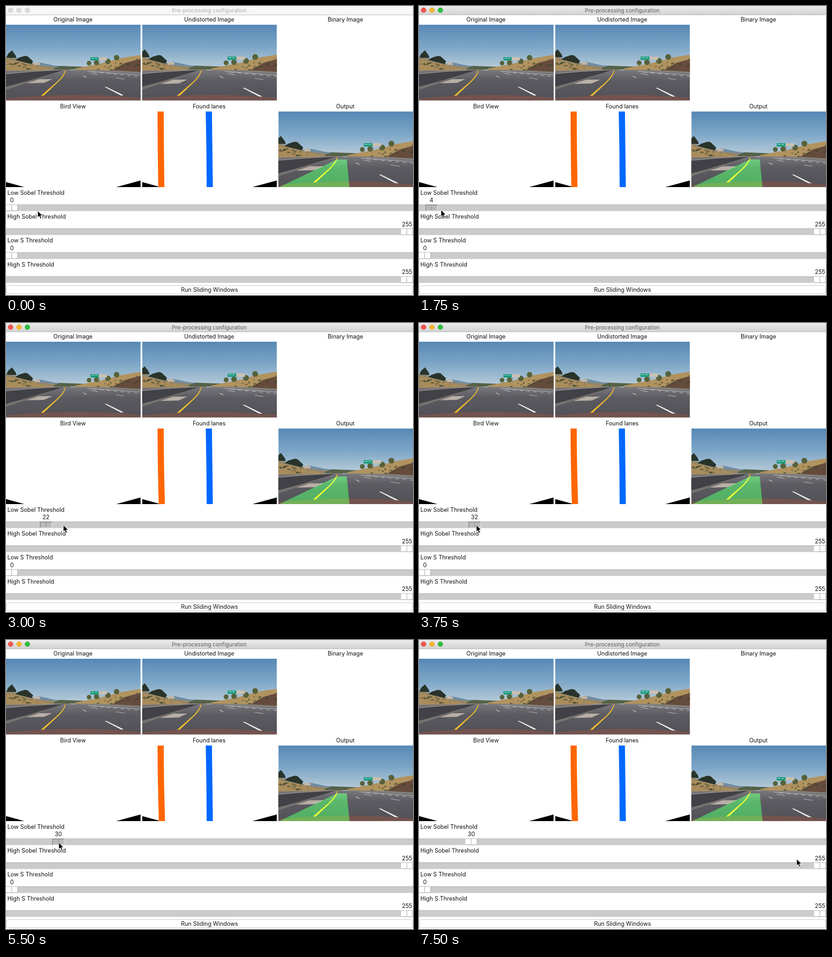
Recreate the animation shown at these times as an HTML page. Size 887x632 px, loop 8000 ms.

```html
<!DOCTYPE html>
<html lang="en">
<head>
<meta charset="utf-8">
<title>Pre-processing configuration</title>
<style>
  html, body { margin: 0; width: 100%; height: 100%; overflow: hidden; background: #fff; }
  svg { display: block; }
  text { font: 12.5px Inter, "Open Sans", sans-serif; fill: #111; }
  .mid { text-anchor: middle; }
  #title { font-size: 11.8px; fill: #5c5c5c; }
  #bar { fill: url(#chrome); }
  .light { stroke-width: .8; }
  .idle #bar { fill: #f6f6f6; }
  .idle #title { fill: #adadad; }
  .idle .light { fill: #dadada; stroke: #c6c6c6; }
  .thumb .face { fill: #fff; }
  .thumb .edge { fill: none; stroke: #a2a2a2; }
  .thumb .inset { fill: none; stroke: none; }
  .pressed .face { fill: #b9b9b9; }
  .pressed .edge { stroke: #e6e6e6; }
  .pressed .inset { stroke: #6e6e6e; }
</style>
</head>
<body>
<svg id="stage" width="887" height="632" viewBox="0 0 887 632">
  <defs>
    <linearGradient id="chrome" x2="0" y2="1">
      <stop stop-color="#ececec"/><stop offset="1" stop-color="#d2d2d2"/>
    </linearGradient>
    <linearGradient id="sky" x2="0" y2="1">
      <stop stop-color="#5688b5"/><stop offset=".5" stop-color="#7ea7c8"/>
      <stop offset="1" stop-color="#bdcfda"/>
    </linearGradient>
    <linearGradient id="asphalt" x2="0" y2="1">
      <stop stop-color="#77777c"/><stop offset=".25" stop-color="#5b5b61"/>
      <stop offset="1" stop-color="#4a4a50"/>
    </linearGradient>
    <g id="land">
      <path fill="#6e8ca5" d="M55 92V86L72 82 104 89 128 91V96Z"/>
      <path fill="#94866a" d="M-15 70 10 72 52 82 66 88 140 95V101H-15Z"/>
      <path fill="#a98c5c" d="M-15 73 14 78 62 89 110 101H-15Z"/>
      <path fill="#556148" d="M104 95 118 90 172 92 190 88V98H104Z"/>
      <path fill="#b1935f" d="M150 96 205 85 250 73 310 63V105H150Z"/>
      <path fill="#654c3c" d="M232 100 258 84 310 70V105Z"/>
      <g id="shrubs" fill="#3c4630"></g>
      <g fill="#29332a">
        <path d="M1 72 4 64 13 56 21 67 23 73Z"/>
        <path d="M20 77 28 72 41 68 47 69 59 80 56 86Z"/>
      </g>
      <g fill="#56613a">
        <circle cx="181" cy="84" r="5"/><circle cx="197" cy="83" r="5.500"/>
        <circle cx="222" cy="80" r="6"/><circle cx="241" cy="72" r="6"/>
      </g>
      <path stroke="#77736d" d="M67.500 87V98M203 77V91M217 77V86"/>
      <path fill="#c4b6a4" d="M61 83H74V88H61Z"/>
      <path fill="#c9c0b1" d="M202 71H220V78H202Z"/>
      <path fill="#169a7c" d="M184 71H202V78H184Z"/>
      <path stroke="#bfe3d5" d="M186 73.500H192M194 73.500H199"/>
      <path fill="url(#asphalt)" d="M-15 101 118 99 220 100 310 107V190H-15Z"/>
      <path fill="#85817c" d="M150 98 220 99 310 104V107L150 99.500Z"/>
      <path fill="#414147" d="M-15 109 60 102 124 99 100 108 50 122-15 140Z"/>
      <path fill="none" stroke="#96918b" stroke-width="1.6" d="M-15 108.500 60 102 119 98.500"/>
      <path fill="#77716e" d="M-15 140 50 122 124 100 50 126-15 147Z"/>
      <path fill="#b9afa6" d="M45 128 72 119H101L83 127Z"/>
      <path fill="#f4bc2d" d="M130 100Q128 112 115 124L79 158H73L112 124Q126 111 128.500 100Z"/>
      <path fill="#f4f4f2" d="M215 136H219L256 154 251 155ZM167 111.500H169L176 115.500H174Z"/>
      <path fill="none" stroke="#c9c9c9" stroke-width=".9" d="M184 106 200 109M240 116 258 119M178 102 310 111"/>
      <path fill="none" stroke="#d8d8d8" stroke-width=".8" stroke-dasharray="7 8" d="M190 103.500 310 115"/>
    </g>
    <path id="hood" fill="#73534e" d="M0 161Q150 146 293.500 160V165.500H0Z"/>
    <path id="corners" d="M0 154.500 40 165.500H0ZM240 165.500 293.500 151V165.500Z"/>
  </defs>

  <rect width="887" height="632" fill="#fff"/>
  <rect id="bar" width="887" height="19"/>
  <path d="M0 19.500H887" stroke="#b9b9b9"/>
  <g id="lights"></g>
  <text id="title" class="mid" x="443" y="13.500">Pre-processing configuration</text>
  <g id="panels"></g>
  <g id="sliders"></g>
  <rect x=".5" y="611.500" width="886" height="17.500" rx="4" fill="#fff" stroke="#c5c5c5"/>
  <text class="mid" x="443.500" y="625">Run Sliding Windows</text>
  <path id="cursor" d="M0 0V14.500L3.400 11.400 6 17 8.500 16 6 10.500H10.500Z" stroke="#fff" stroke-width=".9"/>
</svg>
<script>
const $ = id => document.getElementById(id);
const LOOP = 8000, TICK = 250, TRACK = 861, THUMB = 26;

// time, then the values reached at that time
const cursorKeys = [
  [0, 69, 448], [250, 58, 456], [750, 15, 449], [1000, 14, 448], [1250, 20, 448],
  [1750, 48, 446], [2500, 97, 444], [3000, 125, 442], [3750, 125, 442], [4500, 116, 442],
  [4750, 115, 442], [6000, 115, 444], [6500, 678, 518], [6750, 678, 518], [7500, 823, 479]
];
const valueKeys = [
  [1000, 0], [1250, 1], [1750, 4], [2500, 17], [3000, 22], [3500, 30],
  [4000, 33], [4500, 33], [5250, 30]
];

function valuesAt(keys, time) {
  const next = keys.findIndex(key => key[0] > time);
  if (next < 1) return keys.at(next).slice(1);
  const a = keys[next - 1], b = keys[next];
  const part = (time - a[0]) / (b[0] - a[0]);
  return a.slice(1).map((v, i) => Math.round(v + (b[i + 1] - v) * part));
}

function scatterShrubs() {
  let seed = 7;
  const random = () => (seed = seed * 16807 % 2147483647) / 2147483647;
  let marks = '';
  for (let i = 0; i < 46; i++) {
    const right = i % 2;
    const x = right ? 200 + random() * 95 : random() * 58;
    const top = right ? 86 - (x - 200) * .17 : 74 + x * .2;
    const y = top + 2 + random() * (right ? 16 : 12);
    marks += `<ellipse cx="${x}" cy="${y}" rx="${1 + random() * 3}" ry="${.7 + random() * 1.5}" opacity="${.35 + random() * .5}"/>`;
  }
  $('shrubs').innerHTML = marks;
}

const road = zoom => `<rect width="293.5" height="100" fill="url(#sky)"/>
  <use href="#land" transform="translate(146 99) scale(${zoom}) translate(-146 -99)"/>
  <use href="#hood"/>`;

const panels = [
  ['Original Image', road(1)],
  ['Undistorted Image', road(1.055)],
  ['Binary Image', ''],
  ['Bird View', '<use href="#corners"/>'],
  ['Found lanes', `<use href="#corners"/><path id="leftLane" fill="#ff6600"/>
    <path fill="#0068ff" d="M138.5 0H152L154 165.5H140.5L140 90Z"/>`],
  ['Output', road(1.055) + `<path d="M128 105H149L155 165.5H2Z" fill="#005c0a"
    style="mix-blend-mode:plus-lighter"/>`]
];

function buildPanels() {
  $('panels').innerHTML = panels.map(([label, body], i) => {
    const x = i % 3 * 296.8, y = i < 3 ? 41 : 230.5;
    return `<text class="mid" x="${x + 146}" y="${y - 7}">${label}</text>
      <svg x="${x}" y="${y}" width="293.5" height="165.5" overflow="hidden">${body}</svg>`;
  }).join('');
}

const thumbX = value => Math.round(value / 255 * TRACK);

function buildSliders() {
  const rows = [['Low Sobel', 0], ['High Sobel', 255], ['Low S', 0], ['High S', 255]];
  $('sliders').innerHTML = rows.map(([name, value], i) => `
    <g transform="translate(0 ${434 + i * 52.35})">
      <text x="3" y="-21.5">${name} Threshold</text>
      <rect width="887" height="14.5" fill="#cbcbcb"/>
      <path d="M0 .5H887" stroke="#b4b4b4"/>
      <g class="thumb" transform="translate(${thumbX(value)} 0)">
        <text class="mid" x="13" y="-4.8">${value}</text>
        <rect class="face" y="1" width="${THUMB}" height="13"/>
        <path class="edge" d="M12.5 1V14M25.5 1V14M0 13.8H26"/>
        <path class="inset" d="M.5 14V1H26M13 2V13"/>
      </g>
    </g>`).join('');
}

function buildLights() {
  const colors = [['#f2564d', '#d9443c'], ['#f8b62c', '#dc9c20'], ['#2cc03c', '#22a530']];
  $('lights').innerHTML = colors.map(([fill, stroke], i) =>
    `<circle class="light" cx="${10 + i * 18.3}" cy="9" r="5.3" fill="${fill}" stroke="${stroke}"/>`).join('');
}

scatterShrubs();
buildLights();
buildPanels();
buildSliders();

const thumb = document.querySelector('.thumb');
const thumbLabel = thumb.querySelector('text');

function render(time) {
  const [x, y] = valuesAt(cursorKeys, time);
  const [value] = time < 1000 ? [0] : valuesAt(valueKeys, time);
  const bend = value / 30 * 1.3;
  $('stage').classList.toggle('idle', time < 750);
  $('cursor').setAttribute('transform', `translate(${x} ${y})`);
  thumb.classList.toggle('pressed', time >= 1000 && time < 6250);
  thumb.setAttribute('transform', `translate(${thumbX(value)} 0)`);
  thumbLabel.textContent = value;
  $('leftLane').setAttribute('d',
    `M33.5 0H47Q47 70 ${48.5 + bend} 165.5H${35 + bend}Q33.5 70 33.5 0Z`);
}

const start = performance.now();
let shown = -1;
function tick() {
  const time = Math.floor((performance.now() - start) % LOOP / TICK) * TICK;
  if (time !== shown) render(shown = time);
  requestAnimationFrame(tick);
}
tick();
</script>
</body>
</html>
```
